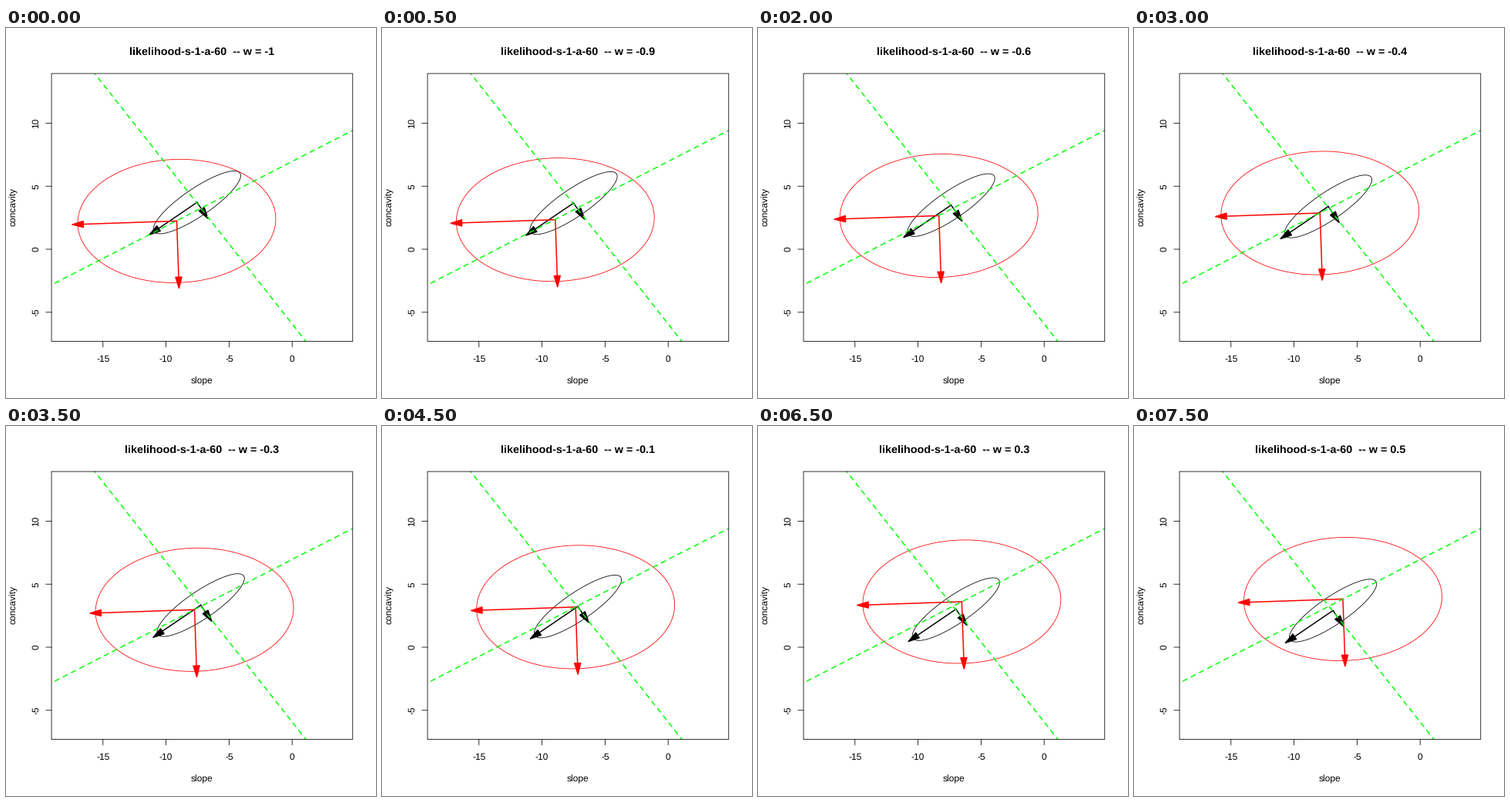
Write a matplotlib script that moves like this. It is 480 px wide and 480 px high and loops after 8000 ms.

```python
import numpy as np
import matplotlib.pyplot as plt
from matplotlib.animation import FuncAnimation
from matplotlib.patches import Polygon, Rectangle

SIZE, DPI = 480, 72  # one point equals one pixel
FRAMES, INTERVAL = 16, 500
LEFT, RIGHT, TOP, BOTTOM = 59.04, 449.76, 59.04, 406.56
UNIT, X0, Y0 = 16.36, 371.2, 287.0
THIN, THICK = 0.8, 1.5
GREEN = "#00ff00"
HEAD = np.array([[7.15, 0], [-7.15, 4], [-7.15, -4]])

plt.rcParams["font.family"] = "Liberation Sans"
plt.rcParams["text.hinting"] = "none"
fig = plt.figure(figsize=(SIZE / DPI, SIZE / DPI), dpi=DPI, facecolor="white")
ax = fig.add_axes([0, 0, 1, 1])
ax.set_xlim(0, SIZE)
ax.set_ylim(SIZE, 0)
ax.axis("off")


def line(xs, ys, **style):
    return ax.plot(xs, ys, snap=False, **style)[0]


def label(x, y, text, size=12, **style):
    return ax.text(x, y, text, fontsize=size, ha="center", va="baseline", **style)


def side_label(x, y, text):
    label(x, y, text, rotation=90, rotation_mode="anchor")


class Arrow:
    """A shaft with a filled head centred on its far end."""

    def __init__(self, vec, color, z):
        self.vec = np.array(vec)
        d = self.vec / np.hypot(*self.vec)
        self.head_pts = HEAD @ np.array([d, [-d[1], d[0]]]) + self.vec
        self.shaft = line([], [], color=color, lw=THICK, zorder=z)
        self.head = Polygon(self.head_pts, fc=color, ec=color, lw=THICK,
                            joinstyle="round", zorder=z)
        ax.add_patch(self.head)

    def move(self, c):
        end = c + self.vec
        self.shaft.set_data([c[0], end[0]], [c[1], end[1]])
        self.head.set_xy(self.head_pts + c)


class Spread:
    """An ellipse with an arrow along each half axis, drifting steadily."""

    def __init__(self, start, step, a, b, angle, color, z):
        self.start, self.step = np.array(start), np.array(step)
        major = a * np.array([-np.cos(angle), np.sin(angle)])
        minor = b * np.array([np.sin(angle), np.cos(angle)])
        t = np.linspace(0, 2 * np.pi, 300)[:, None]
        self.curve = major * np.cos(t) + minor * np.sin(t)
        self.outline = line([], [], color=color, lw=THIN, zorder=z)
        self.arrows = [Arrow(v, color, z + 1) for v in (major, minor)]

    def move(self, i):
        c = self.start + i * self.step
        self.outline.set_data(*(self.curve + c).T)
        for arrow in self.arrows:
            arrow.move(c)


box = Rectangle((LEFT, TOP), RIGHT - LEFT, BOTTOM - TOP, fill=False,
                ec="black", lw=THIN, snap=False, zorder=8)
ax.add_patch(box)

for v in (-15, -10, -5, 0):
    x = X0 + UNIT * v
    line([x, x], [BOTTOM, BOTTOM + 7.2], color="black", lw=THIN)
    label(x, 433, str(v))
for v in (-5, 0, 5, 10):
    y = Y0 - UNIT * v
    line([LEFT - 7.2, LEFT], [y, y], color="black", lw=THIN)
    side_label(42, y, str(v))

label((LEFT + RIGHT) / 2, 462, "slope")
side_label(13.3, (TOP + BOTTOM) / 2 - 1, "concavity")
title = label((LEFT + RIGHT) / 2, 35, "", 14.4, weight="bold")

for xs, ys in (((LEFT, RIGHT), (-12, 483.6)), ((52.8, RIGHT), (336.4, 132.9))):
    guide = line(xs, ys, color=GREEN, lw=THICK, dashes=(4, 4),
                 dash_capstyle="round", zorder=7)
    guide.set_clip_path(box)

spreads = [
    Spread((247.8, 226.2), (0.69, 0.88), 67.4, 18, np.radians(34.2), "black", 3),
    Spread((221.5, 250.4), (3.3, -1.73), 128.5, 80, 0.034, "red", 5),
]


def update(i):
    title.set_text(f"likelihood-s-1-a-60  -- w = {(i - 10) / 10:g}")
    for s in spreads:
        s.move(i)
    return []


anim = FuncAnimation(fig, update, frames=FRAMES, interval=INTERVAL,
                     repeat=True, repeat_delay=0, blit=False)
plt.show()
```
